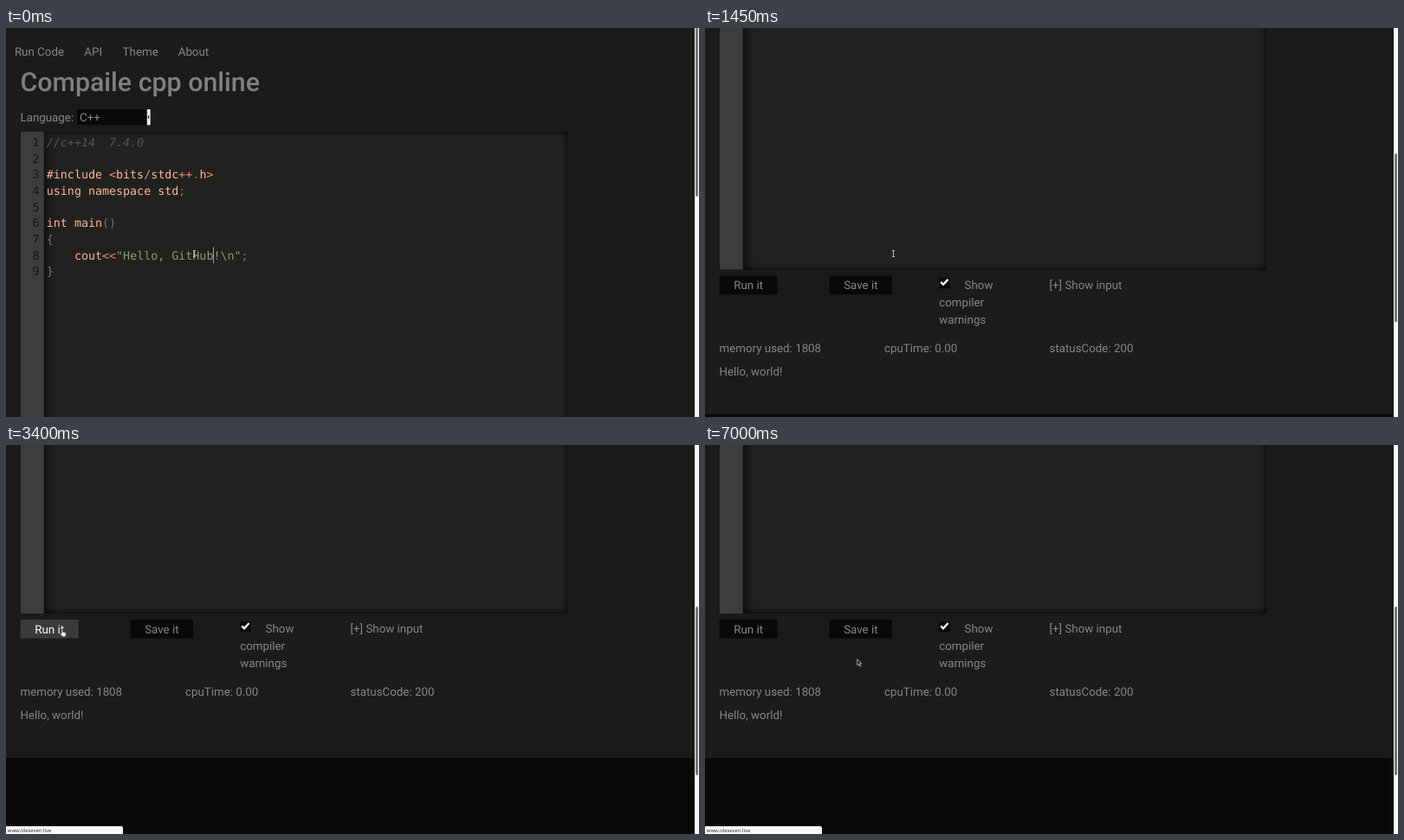
Write an HTML page that moves like this. It is 800 by 450 pixels and loops after 8 s.

```html
<!DOCTYPE html>
<html lang="en">
<head>
<meta charset="utf-8">
<title>Online compiler</title>
<style>
html, body { margin: 0; width: 100%; height: 100%; overflow: hidden; background: #1b1b19; }
#stage { position: relative; width: 800px; height: 450px; overflow: hidden; background: #1b1b19; }
#stage div, #stage svg { position: absolute; }
#page { left: 0; top: 0; width: 795px; height: 840px; }
#page svg, #overlay { left: 0; top: 0; }
#editor { left: 17px; top: 120px; width: 631px; height: 455px; overflow: hidden;
  background: #212120; box-shadow: inset 0 0 7px #000; }
#gutter { left: 0; top: 0; width: 26px; height: 100%; background: #3d3d3c;
  border-right: 1px solid #30302f; box-shadow: 0 6.7px 13px #000; }
#footer { left: 0; top: 742px; width: 795px; height: 98px; background: #090908; }
#track { left: 795px; top: 0; width: 5px; height: 450px; background: #fbfbfa; }
#thumb { left: 1.3px; top: .4px; width: 2.7px; height: 194.6px; border-radius: 1.4px; background: #757574; }
#status { left: 0; top: 440.5px; width: 134.5px; height: 10px; background: #fafaf9; border-radius: 0 2px 0 0; }
text { white-space: pre; text-rendering: geometricPrecision; }
.ui { font: 13.33px Roboto, sans-serif; fill: #878786; }
.title { font: 500 30.3px Roboto, sans-serif; fill: #80807f; }
.code, .num { font: 13.33px "DejaVu Sans Mono", monospace; fill: #757573; }
.num { fill: #111; text-anchor: end; text-shadow: 0 .7px .7px #4d4d4d; }
.mid { text-anchor: middle; }
.v { fill: #ffb795; }
.o { fill: #fa8d6a; }
.s { fill: #8f9d6a; }
.c { fill: #555; font-style: italic; }
.tiny { font: 5.9px "Noto Sans", sans-serif; fill: #333; }
</style>
</head>
<body>
<div id="stage">
  <div id="page">
    <div id="editor"><div id="gutter"></div></div>
    <div id="footer"></div>
    <svg id="ink" width="795" height="840">
      <rect x="82" y="94" width="84.7" height="18.3" fill="#090908"/>
      <rect x="162.8" y="94" width="3.9" height="18.3" fill="#f0f0ee"/>
      <rect x="163.9" y="101.2" width="1.3" height="3.6" fill="#222"/>
      <rect id="run" x="16.7" y="582" width="67" height="21.6" fill="#090908"/>
      <rect x="143.7" y="582" width="72.3" height="21.6" fill="#090908"/>
      <rect x="270.4" y="584" width="12.6" height="12.6" fill="#090908"/>
      <path d="M272.2 589.2L275 592.2L280.6 586" fill="none" stroke="#fff" stroke-width="2.3"/>
      <rect id="caret" x="239" y="253.6" width="1" height="18.7" fill="#8fa0d8"/>
    </svg>
  </div>
  <div id="track"><div id="thumb"></div></div>
  <div id="status"></div>
  <svg id="overlay" width="800" height="450">
    <text id="link" class="tiny" x="1.8" y="447.9">www.ideseven.live</text>
    <g id="mouse">
      <path id="beam" d="M-1.6 -3.4H1.6M0 -3.4V3.4M-1.6 3.4H1.6" fill="none" stroke="#d0d0ce" stroke-width=".9"/>
      <path id="arrow" d="M.3 .3V7.2L1.8 5.8L3 8.4L4.2 7.9L3.1 5.3H5.2Z" fill="#151515" stroke="#e4e4e2" stroke-width=".7"/>
      <path id="hand" d="M.6 .6Q1.3 -.2 2 .6V3.6L5.2 4.3Q6 4.6 5.8 5.6L5.2 9.2H1.6L-1.2 6Q-1.2 5 0 5.2L.6 5.7Z" fill="#f4f4f2" stroke="#1a1a1a" stroke-width=".5"/>
    </g>
  </svg>
</div>
<script>
const $ = id => document.getElementById(id);
const NS = "http://www.w3.org/2000/svg";
const ink = $("ink");

// parts: plain strings or [class, string] pairs
function put(cls, x, y, ...parts) {
  const node = document.createElementNS(NS, "text");
  node.setAttribute("class", cls);
  node.setAttribute("x", x);
  node.setAttribute("y", y);
  for (const part of parts) {
    const [kind, str] = Array.isArray(part) ? part : ["", part];
    const span = document.createElementNS(NS, "tspan");
    if (kind) span.setAttribute("class", kind);
    span.textContent = str;
    node.append(span);
  }
  ink.insertBefore(node, $("caret"));
  return node;
}

const column = i => 16.5 + i * 190.5;

put("ui", 9.9, 31.6, "Run Code");
put("ui", 90.3, 31.6, "API");
put("ui", 134.6, 31.6, "Theme");
put("ui", 198.7, 31.6, "About");
put("title", 16.5, 72.5, "Compaile cpp online");
put("ui", 16.5, 107.9, "Language:");
put("ui", 85, 107.9, "C++");

const runText = put("ui mid", 50.2, 597.8, "Run it");
put("ui mid", 179.9, 597.8, "Save it");
["Show", "compiler", "warnings"].forEach((word, i) =>
  put("ui", i ? 270.2 : 299.6, 596.9 + i * 20, word));
put("ui", column(2), 596.9, "[+] Show input");
["memory used: 1808", "cpuTime: 0.00", "statusCode: 200"].forEach((str, i) =>
  put("ui", column(i), 670.3, str));
put("ui", column(0), 697.2, "Hello, world!");

const code = [
  [["c", "//c++14  7.4.0"]],
  [],
  [["v", "#include "], ["o", "<"], ["v", "bits"], ["o", "/"], ["v", "stdc"], ["o", "++"], ".", ["v", "h"], ["o", ">"]],
  [["v", "using namespace std"], ";"],
  [],
  [["v", "int main"], "()"],
  ["{"],
  ["    ", ["v", "cout"], ["o", "<<"], ["s", "\"Hello, GitHub!\\n\""], ";"],
  ["}"]
];
code.forEach((line, i) => {
  const y = 137 + i * 18.667;
  put("num", 38.6, y, String(i + 1));
  put("code", 46.8, y, ...line);
});

const LOOP = 8000, TICK = 50;
const clamp = p => Math.min(1, Math.max(0, p));
const progress = (t, from, to) => clamp((t - from) / (to - from));
const easeOut = p => 1 - (1 - p) ** 4;

// the pointer rests at each stop and travels along quadratic curves between them
const editorStop = [217.5, 261], pageStop = [108.3, 241.5], runStop = [63.6, 212.6], endStop = [175.5, 247.5];
const moves = [
  { from: 1850, to: 2050, a: editorStop, bend: [177.5, 266.8], b: pageStop },
  { from: 2100, to: 2400, a: pageStop, bend: [78, 218], b: runStop },
  { from: 4765, to: 5650, a: runStop, bend: [150, 256], b: endStop }
];

function pointer(t) {
  const { from, to, a, bend, b } = moves.findLast(m => t >= m.from) || moves[0];
  const p = progress(t, from, to), q = 1 - p;
  return a.map((start, i) => start * q * q + bend[i] * 2 * p * q + b[i] * p * p);
}

const show = (id, on) => $(id).style.display = on ? "" : "none";

function render(time) {
  const t = Math.floor(time / TICK) * TICK;
  const scroll = 380 * easeOut(progress(t, 1210, 1977));
  const [x, y] = pointer(t);
  $("page").style.transform = `translateY(${-scroll}px)`;
  $("thumb").style.transform = `translateY(${scroll * 0.492}px)`;
  $("mouse").setAttribute("transform", `translate(${x} ${y})`);

  const inEditor = t < 1900;
  const hover = !inEditor && x < 83.7 && y < 223.6;
  $("run").setAttribute("fill", hover ? "#3b3b3a" : "#090908");
  runText.style.fill = hover ? "#fff" : "";
  show("beam", inEditor);
  show("hand", hover);
  show("arrow", !inEditor && !hover);
  show("caret", t < 550 || t >= 1050);
  show("status", t >= 3400);
  show("link", t >= 3400);
}

const start = performance.now();
function frame() {
  render((performance.now() - start) % LOOP);
  requestAnimationFrame(frame);
}
frame();
</script>
</body>
</html>
```
